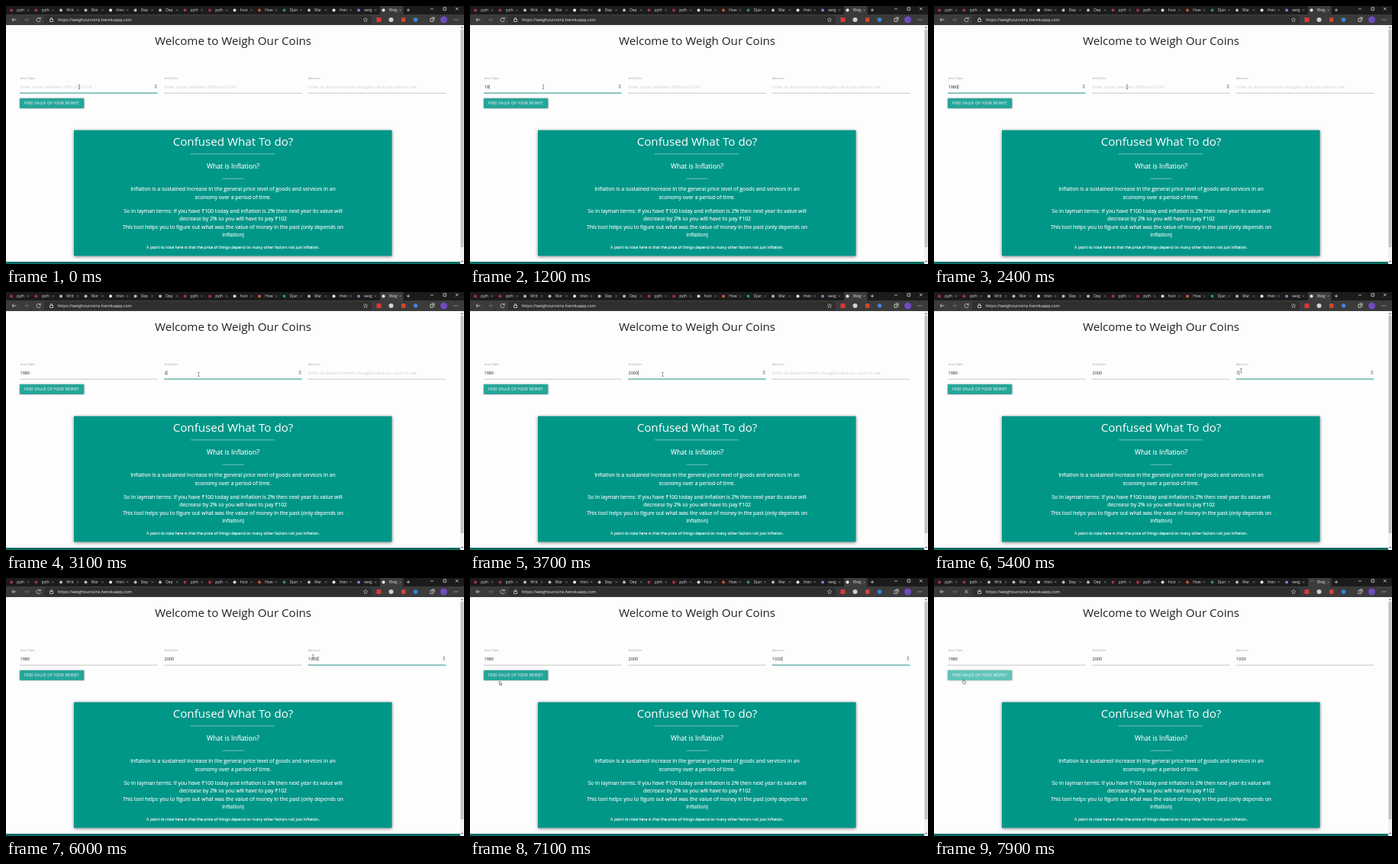
An HTML page for the animation above (8 s loop, 600 by 338 pixels).

```html
<!DOCTYPE html>
<html lang="en">
<head>
<meta charset="utf-8">
<title>Weigh Our Coins</title>
<style>
html, body { margin: 0; height: 100%; overflow: hidden; background: #fdfdfd; }
svg { display: block; width: 100vw; height: 100vh; }
text { font-family: "Open Sans", "Noto Sans", sans-serif; font-size: 6.88px; white-space: pre; }
.big { font-size: 15.15px; }
.mid { text-anchor: middle; }
.line { fill: none; stroke-width: .8; }
.ui { stroke: #d8d8d8; }
#card { filter: drop-shadow(0 1.6px 2.2px rgba(0,0,0,.5)); }
#copy text:not(.big) { stroke: #fff; stroke-width: .12px; }
#button { filter: drop-shadow(0 .8px .8px rgba(0,0,0,.45)); }
</style>
</head>
<body>
<svg viewBox="0 0 600 338">
  <rect width="600" height="338" fill="#fdfdfd"/>

  <rect width="600" height="11" fill="#1b1b1b"/>
  <rect x="490" width="30.5" height="12" fill="#3b3b3b"/>
  <g id="tabs"></g>
  <path class="line ui" d="M525 5.3h4M527 3.3v4M556 4h4M573 2h3.6v3.6h-3.6zM589 2l3.6 3.6m0-3.6l-3.6 3.6"/>

  <rect y="11" width="600" height="14" fill="#3b3b3b"/>
  <rect x="50" y="12.5" width="429" height="11" rx="1.5" fill="#2f2f2f"/>
  <path class="line ui" d="M13.5 18h-5.5m2.3-2.3l-2.3 2.3 2.3 2.3"/>
  <path class="line" stroke="#777" d="M24 18h5.5m-2.3-2.3l2.3 2.3-2.3 2.3"/>
  <path class="line ui" id="reload" d="M44.8 16.6a2.6 2.6 0 1 0 .4 2M45.2 14.8v2h-2"/>
  <path class="line ui" id="stop" d="M40.2 15.8l4.4 4.4m0-4.4l-4.4 4.4"/>
  <path class="line ui" d="M57.5 17.3h4v3.2h-4zM58.5 17.3v-1a1 1 0 0 1 2 0v1"/>
  <text x="68" y="20" fill="#f2f2f2" style="font-size:5.45px">https://weighourcoins.herokuapp.com</text>
  <path class="line ui" style="stroke-width:.5" d="M471 15.2l.8 1.9 2 .2-1.5 1.3.5 2-1.8-1.1-1.8 1.1.5-2-1.5-1.3 2-.2z"/>
  <rect x="485.5" y="15" width="6" height="6" fill="#d63a32"/>
  <circle cx="504.5" cy="18" r="3" fill="#d0d0d0"/>
  <rect x="518" y="15.3" width="5.4" height="5.4" fill="#d9442f"/>
  <circle cx="536.5" cy="18" r="2.8" fill="#3c86d8"/>
  <path class="line ui" d="M556 16.3h3.6v4h-3.6zM557.5 15h3.6v4"/>
  <circle cx="573.5" cy="18" r="4.5" fill="#6d4bc0"/>
  <path d="M586.8 18h1m1.2 0h1m1.2 0h1" stroke="#ddd"/>

  <rect x="595" y="25" width="5" height="313" fill="#f1f1f1"/>
  <rect x="595.6" y="31" width="3.8" height="285" fill="#c1c1c1"/>
  <path d="M596 29l1.5-1.8 1.5 1.8zM596 334l1.5 1.8 1.5-1.8z" fill="#555"/>
  <rect y="335" width="595" height="3" fill="#0a6b62"/>

  <text class="big mid" x="297.5" y="51.2" fill="#222">Welcome to Weigh Our Coins</text>
  <g id="fields"></g>

  <rect id="button" x="18" y="121" width="84.2" height="13" rx=".7"/>
  <text x="24" y="129.4" fill="#fff" style="font-size:4.85px;letter-spacing:.2px">FIND VALUE OF YOUR MONEY</text>

  <rect id="card" x="89" y="162.7" width="416.5" height="164.6" fill="#009688"/>
  <g id="copy" fill="#fff" class="mid">
    <text class="big" x="297.5" y="183.2">Confused What To do?</text>
    <path d="M242 193.4h110v.8h-110zM283.5 225.8h28v.8h-28z" fill-opacity=".6"/>
    <text x="297.5" y="213.3" style="font-size:8.64px">What is Inflation?</text>
    <g id="prose"></g>
    <text x="297.5" y="318.2" style="font-size:5.19px">A point to note here is that the price of things depend on many other factors not just inflation.</text>
  </g>

  <g id="mouse">
    <path id="beam" class="line" stroke="#444" style="stroke-width:.6" d="M-1.2-2.8h.8L0-2.4l.4-.4h.8M0-2.4v4.8M-1.2 2.8h.8L0 2.4l.4.4h.8"/>
    <path id="arrow" fill="#fff" stroke="#222" stroke-width=".5" d="M0 0v5l1.2-1 .9 1.9.8-.4-.9-1.8h1.6z"/>
    <path id="hand" fill="#fff" stroke="#222" stroke-width=".5" d="M-.3.3q.5-.6 1 0v2l2.2.6q.6.2.5.9l-.4 2.2h-2.7l-1.7-2.4q0-.7.9-.1z"/>
  </g>
</svg>
<script>
const LOOP = 8000, TICK = 100, TEAL = "#26a69a";
const $ = id => document.getElementById(id);
const show = (el, on) => el.style.display = on ? "" : "none";

function add(parent, tag, attrs, text = "") {
  const el = document.createElementNS("http://www.w3.org/2000/svg", tag);
  for (const k in attrs) el.setAttribute(k, attrs[k]);
  el.textContent = text;
  return parent.appendChild(el);
}

// Browser tabs
const RED = "#a8323c", GREY = "#b9b9b9";
const tabs = [
  ["pyth", RED], ["pyth", RED], ["Writ", GREY], ["Mar", GREY], ["then", "#eee"], ["Dep", GREY],
  ["Dep", GREY], ["pyth", RED], ["pyth", RED], ["host", "#ddd"], ["How", "#c8553d"], ["Djan", "#2a8a8a"],
  ["Mar", GREY], ["then", "#eee"], ["weig", "#8f7cc4"], ["Weig", "#f5f5f5"]
];
const icons = tabs.map(([name, fill], i) => {
  const x = 7 + i * 32.5;
  add($("tabs"), "text", { x: x + 7.3, y: 7.3, fill: "#ddd", style: "font-size:4.8px" }, name);
  add($("tabs"), "path", { class: "line", stroke: "#bbb", style: "stroke-width:.5", d: `M${x + 21} 4.4l2 2m0-2l-2 2` });
  return add($("tabs"), "circle", { cx: x, cy: 5.5, r: 2, fill });
});
const spinner = add($("tabs"), "path", {
  class: "line", stroke: "#8a8a8a", d: "M495 3.5a2 2 0 0 1 2 2"
});

// Explanation text
[
  [242, "Inflation is a sustained increase in the general price level of goods and services in an"],
  [252.7, "economy over a period of time."],
  [270.6, "So in layman terms: If you have ₹100 today and inflation is 2% then next year its value will"],
  [281.3, "decrease by 2% so you will have to pay ₹102"],
  [291.8, "This tool helps you to figure out what was the value of money in the past (only depends on"],
  [302.3, "inflation)"]
].forEach(([y, line]) => add($("prose"), "text", { x: 297.5, y }, line));

// Form fields: focus interval and the moment of each keystroke
const YEAR = "Enter a year between 1960 and 2018";
const fields = [
  { x: 18, label: "Start Date", hint: YEAR, value: "1980", keys: [500, 1000, 1300, 1700], on: -LOOP, off: 2800 },
  { x: 207, label: "End Date", hint: YEAR, value: "2000", keys: [3100, 3300, 3500, 3700], on: 2800, off: 4900 },
  { x: 395.6, label: "Amount", hint: "Enter an amount whose changed value you want to see",
    value: "1000", keys: [5400, 5600, 5800, 6000], on: 4900, off: 7600 }
];
for (const f of fields) {
  const g = $("fields"), x = f.x + .5, small = "font-size:5.5px";
  add(g, "text", { x, y: 95.5, fill: "#9e9e9e", style: "font-size:4.15px" }, f.label);
  add(g, "rect", { x: f.x, y: 113.8, width: 180.6, height: .6, fill: "#9e9e9e" });
  f.line = add(g, "rect", { x: f.x, y: 113.6, width: 180.6, height: .9, fill: TEAL });
  f.hintEl = add(g, "text", { x, y: 108, fill: "#cfcfcf", style: small }, f.hint);
  f.text = add(g, "text", { x, y: 108, fill: "#222", style: small });
  f.caret = add(g, "rect", { y: 102.8, width: .5, height: 6.2, fill: "#222" });
  f.spin = add(g, "g", { transform: `translate(${f.x + 178.2} 105.4)` });
  add(f.spin, "rect", { x: -2, y: -3.2, width: 4, height: 6.4, fill: "#f0f0f0" });
  add(f.spin, "path", { d: "M-1.2-.9L0-2.4 1.2-.9zM-1.2.9L0 2.4 1.2.9z", fill: "#555" });
}

// Pointer stops: time, x, y
const stops = [
  [0, 96, 106], [2000, 96, 106], [2400, 253, 106], [2900, 252.3, 108], [3800, 252.3, 108],
  [4500, 386.3, 100], [4800, 402.3, 103], [6500, 402.3, 103], [7100, 38.4, 135],
  [7400, 38.4, 132.8], [LOOP, 38.4, 132.8]
];
const clamp = v => Math.max(0, Math.min(1, v));

function pointer(t) {
  const i = stops.findIndex(s => s[0] > t);
  const [t0, x0, y0] = stops[i - 1], [t1, x1, y1] = stops[i];
  const k = (t - t0) / (t1 - t0), e = k * k * (3 - 2 * k);
  return [x0 + (x1 - x0) * e, y0 + (y1 - y0) * e];
}

function draw(t) {
  const [mx, my] = pointer(t);
  for (const f of fields) {
    const count = f.keys.filter(k => k <= t).length;
    const focused = t >= f.on && t < f.off;
    const hover = mx > f.x && mx < f.x + 181 && my > 98 && my < 114;
    f.text.textContent = f.value.slice(0, count);
    f.caret.setAttribute("x", f.x + .6 + count * 3.14);
    show(f.hintEl, !count);
    show(f.caret, focused && t >= 500);
    show(f.spin, focused || hover);
    f.line.style.opacity = clamp((t - f.on) / 300) * clamp(1 - (t - f.off) / 300);
  }

  const press = clamp((t - 7500) / 300);
  const mix = (a, b) => Math.round(a + (b - a) * press);
  $("button").setAttribute("fill", `rgb(${mix(38, 95)},${mix(166, 196)},${mix(154, 186)})`);

  const loading = t >= 7700;
  show($("reload"), !loading);
  show($("stop"), loading);
  show(icons[15], !loading);
  show(spinner, loading);
  spinner.setAttribute("transform", `rotate(${t * .36} 495 5.5)`);

  const beam = my < 114, hand = my > 121 && my < 134 && mx < 102;
  show($("beam"), beam);
  show($("hand"), hand);
  show($("arrow"), !beam && !hand);
  $("mouse").setAttribute("transform", `translate(${mx} ${my})`);
}

const start = performance.now();
function frame() {
  const t = (performance.now() - start) % LOOP;
  draw(Math.floor(t / TICK) * TICK);
  requestAnimationFrame(frame);
}
frame();
</script>
</body>
</html>
```
